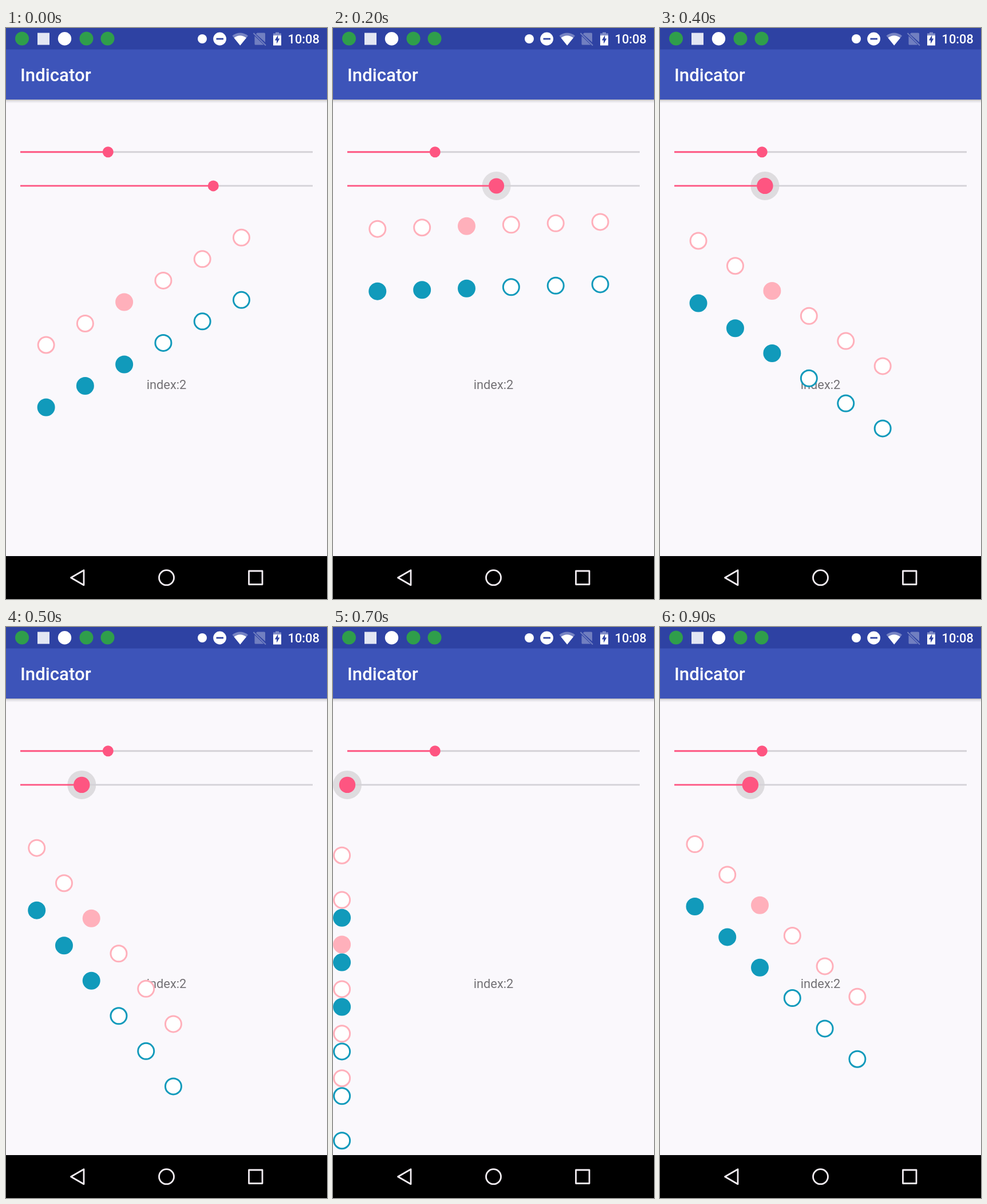
An HTML page that plays this animation: 561x998 px, repeating every 1 s.

```html
<!DOCTYPE html>
<html lang="en">
<head>
<meta charset="utf-8">
<title>Indicator</title>
<style>
  html, body { margin: 0; width: 100%; height: 100%; overflow: hidden; background: #faf8fc; }
  svg { display: block; width: 561px; height: 998px; font-family: Roboto, sans-serif; }
</style>
</head>
<body>
<svg viewBox="0 0 561 998">
  <defs>
    <linearGradient id="shade" x2="0" y2="1">
      <stop stop-color="#000" stop-opacity=".3"/>
      <stop offset=".4" stop-color="#000" stop-opacity=".1"/>
      <stop offset="1" stop-color="#000" stop-opacity="0"/>
    </linearGradient>
  </defs>
  <rect width="561" height="998" fill="#faf8fc"/>

  <!-- app bar -->
  <rect y="124.5" width="561" height="7" fill="url(#shade)"/>
  <rect width="561" height="125" fill="#3d54b9"/>
  <rect width="561" height="37.5" fill="#2e42a3"/>
  <text x="25" y="93" font-size="31.2" font-weight="500" fill="#fff">Indicator</text>

  <!-- status bar -->
  <g fill="#2f9e4b">
    <circle cx="28" cy="18.5" r="12"/>
    <circle cx="140.5" cy="18.5" r="12"/>
    <circle cx="177.5" cy="18.5" r="12"/>
  </g>
  <g fill="#fff">
    <rect x="55" y="8.5" width="21" height="21" fill="#e3e6f3"/>
    <circle cx="102.5" cy="18.7" r="11.7"/>
    <circle cx="343" cy="19" r="8"/>
    <circle cx="373.6" cy="19" r="11.4"/>
    <path d="M367.5 19h12.5" stroke="#2e42a3" stroke-width="2.8"/>
    <path d="M395.5 13.5Q409 3.500 423 13.500L409.200 30.500Z" opacity=".35"/>
    <path d="M398.500 17.200Q409 9.500 420 17.200L409.200 30.500Z"/>
    <g opacity=".32">
      <path d="M439 8.500H451.500Q453 8.500 453 10V25L436.800 10.500ZM434.500 14L450.500 29.500H436Q434.500 29.500 434.500 28Z"/>
      <path d="M432.500 9L454 30.500" stroke="#fff" stroke-width="2"/>
    </g>
    <path d="M467 13V9.500H471V7.500H477V9.500H481V13Z" opacity=".4"/>
    <path d="M467 13H481V30.500H467Z"/>
    <path d="M475.300 12.500L469.800 21.500H473V27.500L478.300 18.500H475.300Z" fill="#2e42a3"/>
    <text x="492.500" y="27" font-size="21.8" font-weight="500">10:08</text>
  </g>

  <text x="280.500" y="631" font-size="21.8" text-anchor="middle" fill="#737175">index:2</text>
  <g id="live"></g>

  <!-- navigation bar -->
  <rect y="923" width="561" height="75"/>
  <g fill="none" stroke="#f3eef3" stroke-width="2.800" stroke-linejoin="round">
    <path d="M136 947.800V973.700L113.500 960.700Z"/>
    <circle cx="280.500" cy="960.700" r="13"/>
    <rect x="424.500" y="949" width="23.500" height="23.500"/>
  </g>
</svg>
<script>
const live = document.getElementById('live');
const PINK = '#fe5581', ROSE = '#ffb0bb', BLUE = '#119abb';
const STEP = 100;
// Slider position in percent, one value per step
const drag = [66, 60, 51, 42, 31, 21, 10, 0, 12, 26];
// Thumb radius, halo radius and halo opacity while the press grows
const press = [[9.5, 0, 0], [11, 20, .012], [13.5, 25, .1], [14.2, 25, .115]];

const circle = (x, y, r, style) => `<circle cx="${x}" cy="${y}" r="${r}" ${style}/>`;
const line = (x1, x2, y, color) =>
  `<path d="M${x1} ${y}H${x2}" stroke="${color}" stroke-width="2.9"/>`;

function slider(y, percent, [thumb, halo, opacity]) {
  const x = 25 + 5.11 * percent;
  return circle(x, y, halo, `opacity="${opacity}"`) +
    line(x, 536, y, '#d4d2d7') + line(25, x, y, PINK) +
    circle(x, y, thumb, `fill="${PINK}"`);
}

function dots(top, percent, color, isFull) {
  const angle = (50 - percent) * Math.PI / 100;
  const cos = Math.cos(angle), sin = Math.sin(angle);
  const startY = top + 512.6 * Math.max(0, -sin);
  let out = '';
  for (let i = 0; i < 6; i++) {
    const d = 62.2 + 77.9 * i;
    const fill = isFull(i) ? color : '#fff';
    out += circle(15.6 + d * cos, startY + d * sin, 14,
      `fill="${fill}" stroke="${color}" stroke-width="3"`);
  }
  return out;
}

let shown = -1;
function draw(now) {
  const n = Math.floor(now / STEP) % drag.length;
  if (n !== shown) {
    shown = n;
    const p = drag[n];
    live.innerHTML = slider(216.7, 30, press[0]) +
      slider(275.9, p, press[Math.min(n, 3)]) +
      dots(337, p, ROSE, i => i === 2) +
      dots(446, p, BLUE, i => i <= 2);
  }
  requestAnimationFrame(draw);
}
draw(performance.now() % STEP);
const start = performance.now();
</script>
</body>
</html>
```
